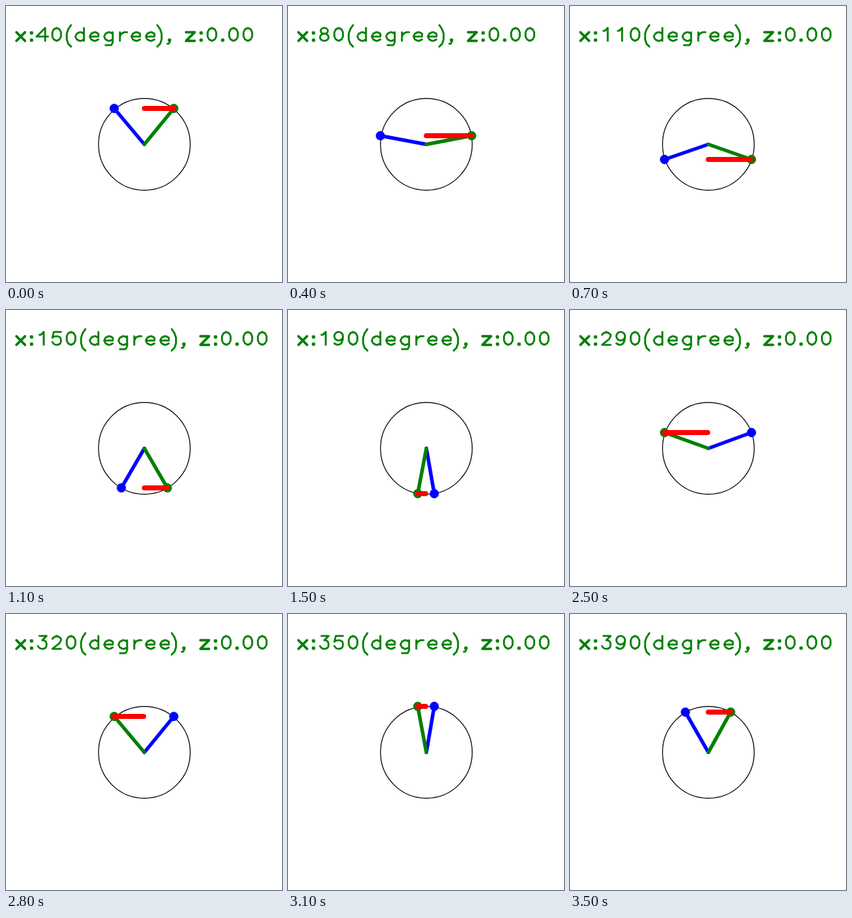
An HTML page with a canvas that plays this animation: 384 px wide and 384 px high, repeating every 3600 ms.

```html
<!DOCTYPE html>
<html lang="en">
<head>
<meta charset="utf-8">
<title>Rotating pointers</title>
<style>
html, body { margin: 0; width: 100%; height: 100%; overflow: hidden; background: #fff; }
canvas { display: block; }
</style>
</head>
<body>
<canvas id="stage" width="384" height="384" role="img"></canvas>
<script>
const stage = document.getElementById('stage');
const ctx = stage.getContext('2d');
const GREEN = '#008000', BLUE = '#00f', RED = '#f00';
const CENTER = 192, RADIUS = 64;

// Single-stroke plotter lettering: advance width, then pen path from the baseline.
const bowl = 'M8-5L6-6H5L3-5 2-3 3-1 5 0H6L8-1';
const dot = 'M2-1H3V0H2Z';
const font = {
  0: [10, 'M5-9L3-8 2-6V-3L3-1 5 0 7-1 8-3V-6L7-8Z'],
  1: [10, 'M3-7H4L6-9V0'],
  2: [10, 'M2-7L3-8 5-9 7-8 8-7V-6L7-4 2 0H8'],
  3: [10, 'M3-9H8L5-6Q8-6 8-3Q8 0 5 0Q3 0 2-2'],
  4: [10, 'M7 0V-9L1-3H9'],
  5: [10, 'M8-9H3L2-5Q3-6 5-6Q8-6 8-3Q8 0 5 0Q3 0 2-2'],
  6: [10, 'M8-8L6-9Q2-9 2-3A3 3 0 0 0 8-3A3 3 0 0 0 2-3'],
  7: [10, 'M2-9H8L4 0'],
  8: [10, 'M5-9A2.5 2 0 0 0 5-5A2.5 2 0 0 0 5-9M5-5A3 2.5 0 0 0 5 0A3 2.5 0 0 0 5-5'],
  9: [10, 'M2-1L4 0Q8 0 8-6A3 3 0 0 0 2-6A3 3 0 0 0 8-6'],
  '(': [6, 'M5-11L3-8 2-5V-1L3 2 5 4'],
  ')': [6, 'M0-11L2-8 3-5V-1L2 2 0 4'],
  d: [10, 'M8-9V0' + bowl],
  e: [10, 'M2-3H8V-5L6-6H5L3-5 2-3 3-1 5 0H6L8-1'],
  g: [10, 'M8-6V1L7 3H3' + bowl],
  r: [9, 'M3-6V0M3-3L4-5 6-6H8'],
  x: [10, 'M2-6L8 0M8-6L2 0'],
  z: [10, 'M2-6H8L2 0H8'],
  ':': [5, 'M2-6H3V-5H2Z' + dot],
  ',': [5, dot + 'M3 0L2 2H1'],
  '.': [5, dot],
  ' ': [7, '']
};
for (const glyph of Object.values(font)) glyph[1] = new Path2D(glyph[1]);

function write(text, x, y) {
  ctx.save();
  ctx.translate(x, y);
  ctx.scale(2, 2);
  ctx.strokeStyle = GREEN;
  for (const char of text) {
    const [advance, path] = font[char];
    ctx.lineWidth = 'xz'.includes(char) ? 1.7 : 1.3;
    ctx.stroke(path);
    ctx.translate(advance, 0);
  }
  ctx.restore();
}

function line(x1, y1, x2, y2, color, width) {
  ctx.strokeStyle = color;
  ctx.lineWidth = width;
  ctx.beginPath();
  ctx.moveTo(x1, y1);
  ctx.lineTo(x2, y2);
  ctx.stroke();
}

function circle(x, y, r) {
  ctx.beginPath();
  ctx.arc(x, y, r, 0, 2 * Math.PI);
}

function pointer(x, y, color) {
  line(CENTER, CENTER, x, y, color, 5);
  circle(x, y, 6.4);
  ctx.fillStyle = color;
  ctx.fill();
}

function draw(degrees) {
  const a = degrees * Math.PI / 180;
  const dx = RADIUS * Math.sin(a);
  const x = Math.floor(CENTER + dx);
  const mirrorX = Math.floor(CENTER - dx);
  const y = Math.floor(CENTER - RADIUS * Math.cos(a));
  const axisX = dx < 0 ? CENTER - 1 : CENTER; // rounds down on the left side
  const label = `x:${degrees}(degree), z:0.00`;

  ctx.fillStyle = '#fff';
  ctx.fillRect(0, 0, 384, 384);
  ctx.lineCap = ctx.lineJoin = 'round';
  stage.setAttribute('aria-label', label);

  ctx.save();
  ctx.translate(0.5, 0.5); // whole coordinates address pixel centers
  write(label, 10, 48);
  circle(CENTER, CENTER, RADIUS - 0.2);
  ctx.strokeStyle = '#000';
  ctx.lineWidth = 1.2;
  ctx.stroke();
  pointer(mirrorX, y, BLUE);
  pointer(x, y, GREEN);
  line(axisX, y, x, y, RED, 7);
  ctx.restore();
}

function tick() {
  const step = Math.floor(performance.now() % 3600 / 100);
  draw(40 + 10 * step);
  requestAnimationFrame(tick);
}
tick();
</script>
</body>
</html>
```
